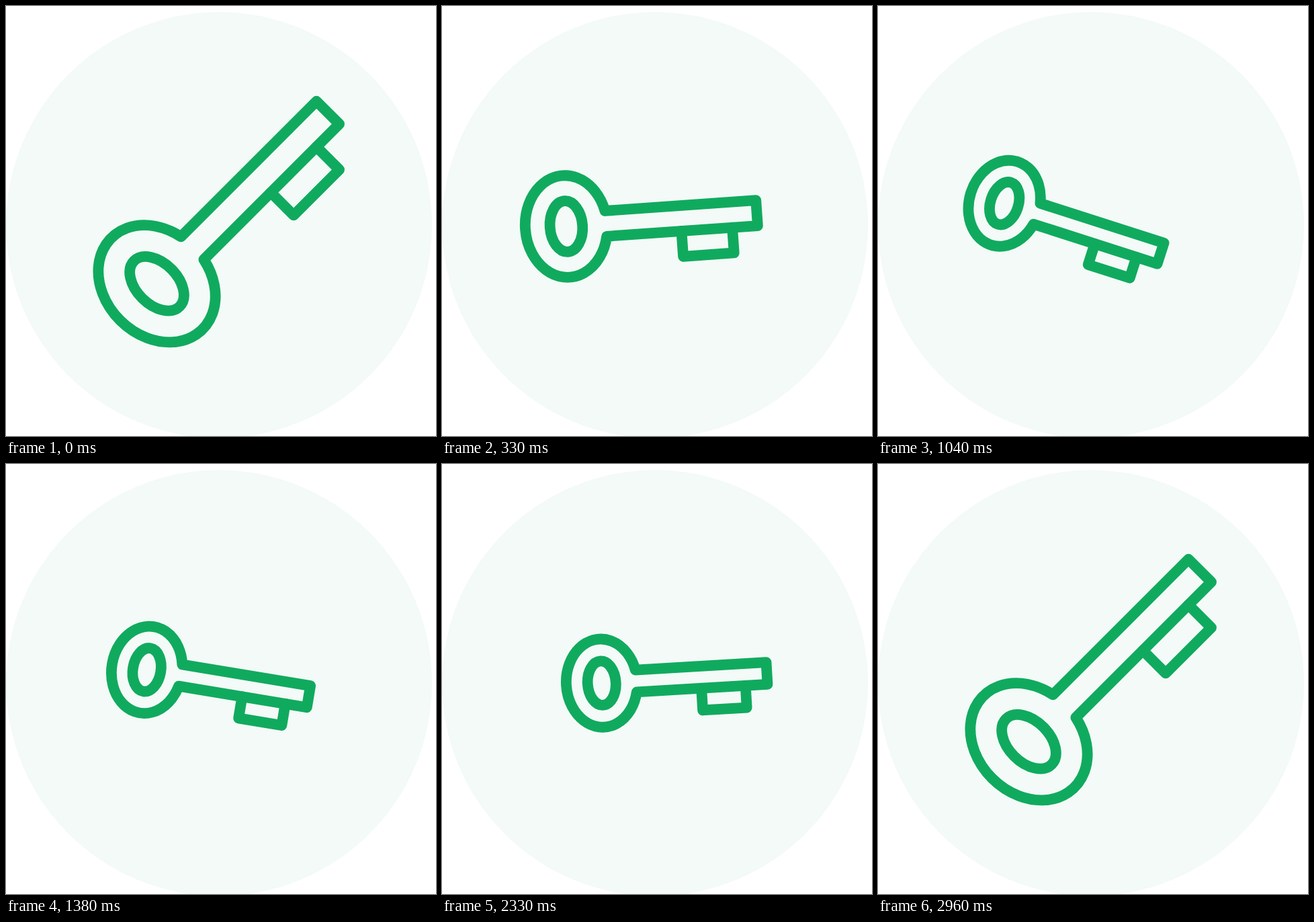
Write an HTML page that moves like this. It is 640 px wide and 640 px high and loops after 3 s.

```html
<!DOCTYPE html>
<html lang="en">
<head>
<meta charset="utf-8">
<title>Key</title>
<style>
  html, body { margin: 0; width: 100%; height: 100%; overflow: hidden; background: #fff; }
  svg { display: block; width: 100%; height: 100%; }
</style>
</head>
<body>
<svg viewBox="0 0 640 640">
  <circle cx="317" cy="326" r="317" fill="#f3faf8"/>
  <g id="key" fill="none" stroke="#10aa5e" stroke-width="15.8" stroke-linejoin="round" stroke-linecap="round">
    <path id="body"/>
    <path id="bit"/>
    <ellipse id="hole"/>
  </g>
</svg>
<script>
const LOOP = 3000, FPS = 24;
const [key, body, bit, hole] = ['key', 'body', 'bit', 'hole'].map(id => document.getElementById(id));

const easeOut = p => 1 - (1 - p) ** 3;
const easeIn = p => p * p;
const smooth = p => p * p * (3 - 2 * p);
const easeInOut = p => p < .5 ? 4 * p ** 3 : 1 - 4 * (1 - p) ** 3;
const phase = (t, from, to, ease) => ease(Math.min(1, Math.max(0, (t - from) / (to - from))));

function draw(t) {
  const tilt = phase(t, 45, 1016, easeOut);
  const insert = phase(t, 1016, 1553, easeIn);
  const turn = phase(t, 1625, 1917, smooth) - phase(t, 2000, 2290, smooth);
  const back = phase(t, 2139, 2951, easeInOut);
  const grow = phase(t, 2212, 2938, easeInOut);

  const x = 317 - 44.5 * tilt + 55.1 * insert - 10.6 * back;
  const angle = -45 + 62.8 * tilt - 18.8 * insert - 44 * back;
  const unit = 24 - 7.73 * (tilt - grow);

  // Lengths are in half shaft widths, measured from the centre of the bow
  const bowX = 3.22, bowY = 4 - .83 * turn, depth = 3 - .97 * turn;
  const neck = bowX * Math.sqrt(1 - 1 / bowY ** 2);
  const u = n => (n * unit).toFixed(2);
  const at = (a, b) => u(a - 5.45) + ' ' + u(b);

  key.setAttribute('transform', `translate(${x} 320.8) rotate(${angle})`);
  body.setAttribute('d', `M${at(15, 1)}L${at(15, -1)}L${at(neck, -1)}` +
    `A${u(bowX)} ${u(bowY)} 0 1 0 ${at(neck, 1)}Z`);
  bit.setAttribute('d', `M${at(9, 1)}L${at(9, depth)}L${at(13, depth)}L${at(13, 1)}`);
  hole.setAttribute('cx', u(-5.45));
  hole.setAttribute('rx', u(1.28));
  hole.setAttribute('ry', u(2 - .74 * turn));
}

const start = performance.now();
function tick() {
  const ms = (performance.now() - start) % LOOP;
  const step = Math.floor((ms + 5) * FPS / 1000);
  draw(step * 1000 / FPS % LOOP);
  requestAnimationFrame(tick);
}
tick();
</script>
</body>
</html>
```
